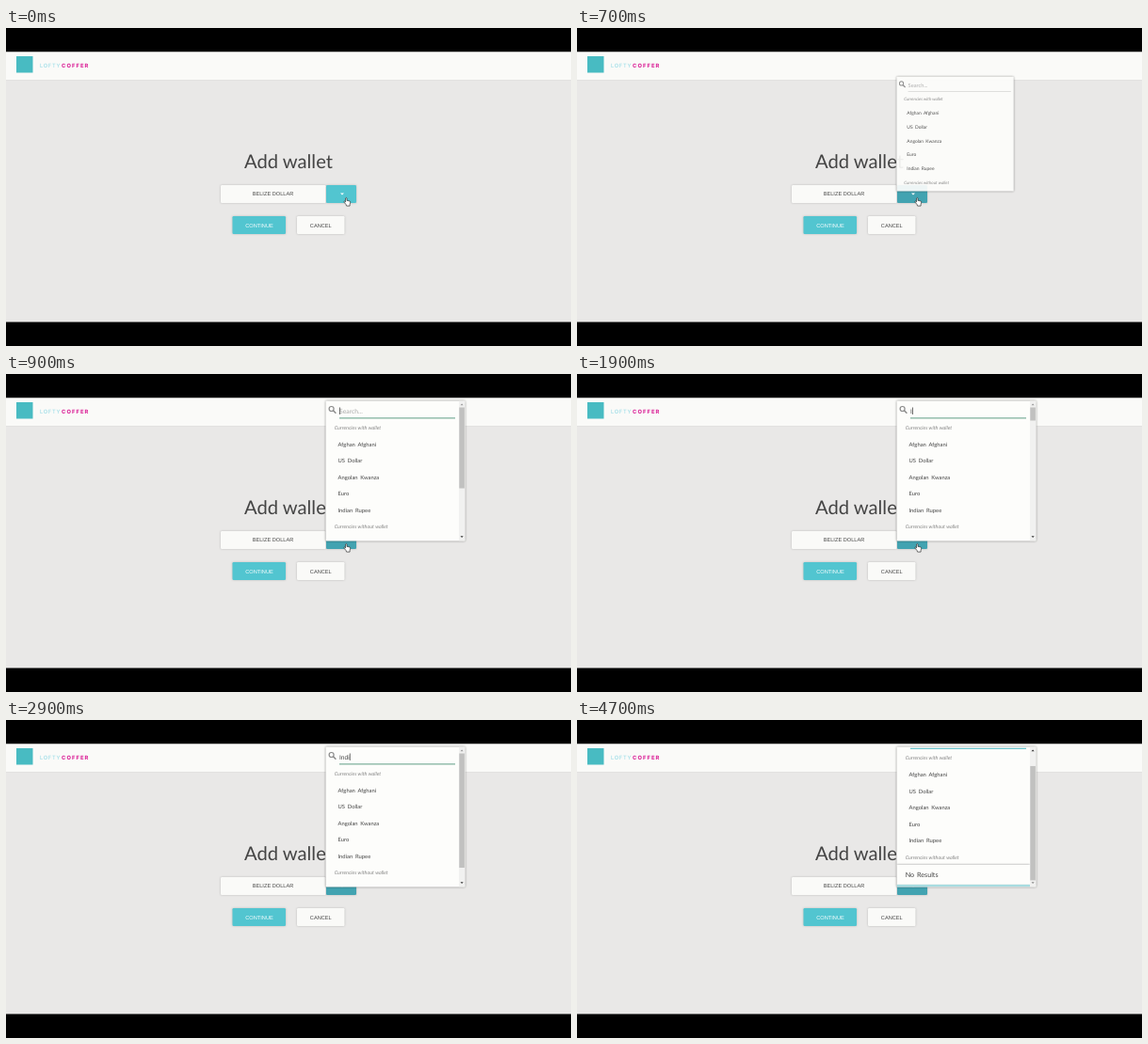
An HTML page that plays this animation: 600x338 px, repeating every 5200 ms.

```html
<!DOCTYPE html>
<html lang="en">
<head>
<meta charset="utf-8">
<title>Add wallet</title>
<style>
html, body { margin: 0; width: 100%; height: 100%; overflow: hidden; background: #000; }
svg { display: block; width: 100%; height: 100%; }
text { font-family: Lato, sans-serif; fill: #444; text-rendering: geometricPrecision; }
.label { font: 5.65px "Liberation Sans", Arial, sans-serif; text-anchor: middle; }
.brand { font-family: Inter, sans-serif; font-size: 5.8px; }
.item { font-size: 5.85px; word-spacing: 1.3px; }
.head { font-size: 5.4px; font-style: italic; fill: #858585; }
.soft { filter: drop-shadow(0 .5px .8px #0003); }
.panel { filter: drop-shadow(0 .6px 1.2px #0007); }
</style>
</head>
<body>
<svg viewBox="0 0 600 338">
  <defs>
    <clipPath id="clip"><rect id="clipBox" x="339.5" y="28.5" width="148" height="149"/></clipPath>
  </defs>
  <rect width="600" height="338"/>
  <rect y="25.5" width="600" height="287" fill="#e9e8e7"/>
  <rect y="25.5" width="600" height="29.5" fill="#fafaf8"/>
  <rect y="55" width="600" height=".6" fill="#dededc"/>
  <rect x="11" y="30" width="17.5" height="17.5" fill="#48bbc2"/>
  <text class="brand" x="36" y="42.3" letter-spacing=".65" style="fill:#8fd8e4">LOFTY</text>
  <text class="brand" x="59" y="42.3" letter-spacing="1.1" font-weight="800" style="fill:#dc2a9b">COFFER</text>

  <text x="300" y="149.4" font-size="20.2" text-anchor="middle">Add wallet</text>
  <g class="soft">
    <rect x="228" y="167" width="111.5" height="19" rx="1.2" fill="#fafaf8"/>
    <rect id="toggle" x="340" y="167" width="32" height="19" rx="1.2"/>
    <rect x="240.5" y="200" width="56.5" height="19" rx="1.2" fill="#52c5d0"/>
    <rect x="309" y="200" width="50.5" height="19" rx="1.2" fill="#fafaf8"/>
  </g>
  <path d="M355 175.6h4l-2 2z" fill="#fff"/>
  <text class="label" x="283.5" y="178.4">BELIZE DOLLAR</text>
  <text class="label" x="269" y="211.5" style="fill:#fff">CONTINUE</text>
  <text class="label" x="334.3" y="211.5">CANCEL</text>

  <g id="menu">
    <rect id="panel" class="panel" x="339.5" y="28.5" width="148" height="149" rx="1" fill="#fdfdfb"/>
    <g clip-path="url(#clip)">
      <g id="content">
        <g fill="none" stroke="#8a8a8a">
          <circle cx="345.6" cy="37" r="2.5" stroke-width="1.2"/>
          <path d="M347.4 38.8l3 3" stroke-width="1.5"/>
        </g>
        <text id="input" x="354" y="41.5"></text>
        <rect id="caret" y="35.5" width=".7" height="7.5" fill="#333"/>
        <rect id="line" x="354"/>
        <g id="list"></g>
        <g id="none">
          <rect x="339.5" y="170.5" width="141.5" height="21" fill="#fdfdfb" class="panel"/>
          <text x="348.7" y="183.6" font-size="7.2" word-spacing="1">No Results</text>
          <rect x="339.5" y="191.5" width="141.5" height="2.5" fill="#a8dce0"/>
        </g>
      </g>
      <g id="bar">
        <rect x="481" y="28.5" width="6.5" height="149" fill="#f1f1f0"/>
        <rect id="thumb" x="481.3" width="5.6" fill="#c1c1c0"/>
        <path id="up" d="M482.5 33.3h3.2l-1.6-1.9z"/>
        <path id="down" d="M482.5 172.2h3.2l-1.6 1.9z"/>
      </g>
    </g>
  </g>
  <path id="hand" d="M361 187.5l-2-2.4q-.4-1 .6-1l1 .8v-4q.7-1.1 1.4 0v2.4l3 .7q.8.3.7 1.2l-.6 2.5v1.4h-3.5z"
        fill="#fff" stroke="#222" stroke-width=".65" stroke-linejoin="round"/>
</svg>
<script>
const $ = id => document.getElementById(id);
const set = (id, attrs) => { for (const k in attrs) $(id).setAttribute(k, attrs[k]); };
const show = (id, on) => set(id, { visibility: on ? 'inherit' : 'hidden' });
const clamp = v => Math.max(0, Math.min(1, v));
const mix = (a, b, p) => a.map((v, i) => Math.round(v + (b[i] - v) * p));

// Value of the last [time, value] step that has begun.
const at = (t, steps) => steps.filter(s => s[0] <= t).pop()[1];

const rows = ['Currencies with wallet', 'Afghan Afghani', 'US Dollar', 'Angolan Kwanza',
  'Euro', 'Indian Rupee', 'Currencies without wallet'];
$('list').innerHTML = rows.map((name, i) => {
  const head = i % 6 === 0;
  return `<text class="${head ? 'head' : 'item'}" x="${head ? 348.7 : 352.5}" y="${59 + i * 17.58}">${name}</text>`;
}).join('');

const typed = [[0, ''], [1900, 'I'], [2300, 'In'], [2700, 'Ind'], [2900, 'Indi'], [3300, 'India'], [3400, 'Indian']];
const thumbs = [[0, 86], [1900, 14], [2300, 57], [2700, 121.5]];

function draw(now) {
  const t = Math.floor(now % 5200 / 100) * 100;
  const open = t >= 900;

  set('toggle', { fill: `rgb(${mix([82, 197, 208], [66, 163, 177], clamp(t / 400))})` });
  show('hand', t < 2500);

  const scale = at(t, [[0, .7], [700, .84], [800, .97], [900, 1]]);
  show('menu', t >= 600);
  set('menu', {
    opacity: at(t, [[0, .4], [700, .92], [800, 1]]),
    transform: `translate(339 174) scale(${scale}) translate(-339 -174)`
  });
  const height = open ? 149 : 145;
  set('panel', { height });
  set('clipBox', { height });

  const text = at(t, typed);
  const input = $('input');
  input.textContent = text || 'Search...';
  input.style.cssText = text
    ? 'font:6.6px "Liberation Sans",Arial,sans-serif;fill:#444'
    : 'font:6.8px Lato,sans-serif;fill:#aaa';
  set('caret', { x: 354 + (text ? input.getComputedTextLength() + .2 : 0) });
  show('caret', open && t < 4000 && !(t >= 1200 && t < 1500));

  const scroll = 16.6 * clamp((t - 4500) / 200);
  set('content', { transform: `translate(0 ${-scroll})` });
  set('line', {
    y: open ? 46.4 : 46.8,
    width: open ? 123 : 130,
    height: open ? 1 : .7,
    fill: scroll ? '#4bb8c2' : open ? '#5f9d86' : '#c8c8c8'
  });
  show('none', scroll > 0);

  show('bar', open);
  set('thumb', { y: 35.5 + scroll * .81, height: at(t, thumbs) });
  set('up', { fill: scroll ? '#333' : '#999' });
  set('down', { fill: scroll > 16 ? '#888' : '#333' });
}

const start = performance.now();
function tick() {
  draw(performance.now() - start);
  requestAnimationFrame(tick);
}
tick();
</script>
</body>
</html>
```
